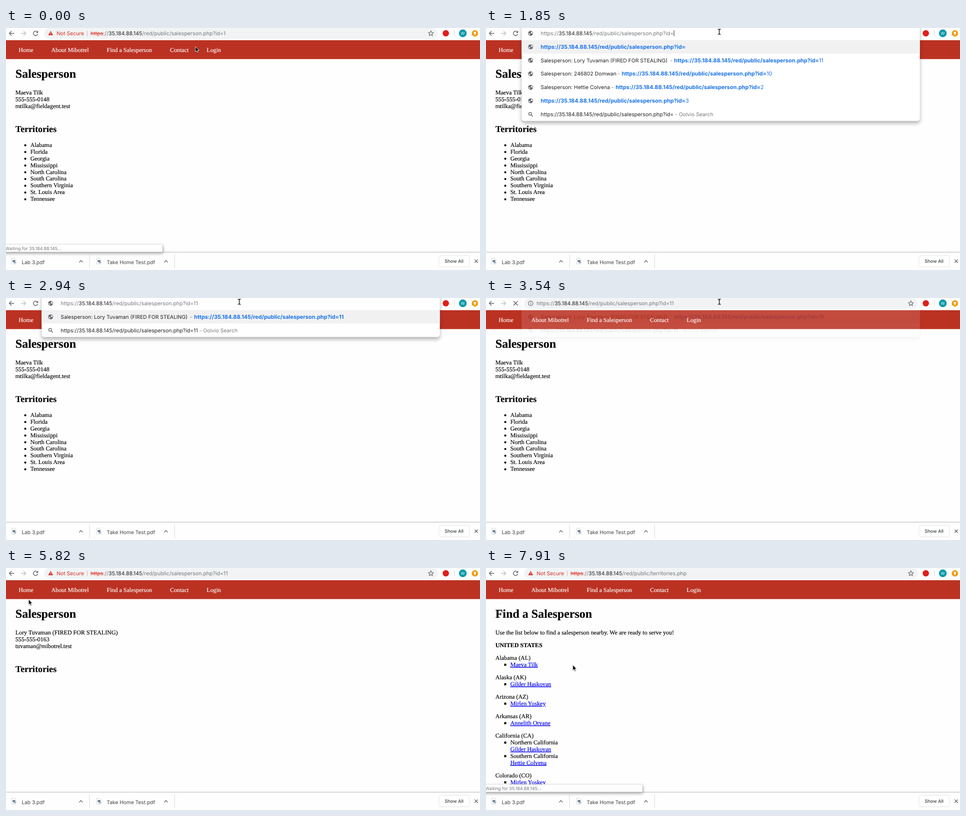
Recreate the animation shown at these times as an HTML page. Size 1047 px wide and 535 px high, loop 8 s.

```html
<!DOCTYPE html>
<html lang="en">
<head>
<meta charset="utf-8">
<title>Salesperson</title>
<style>
  html, body { margin: 0; width: 100%; height: 100%; overflow: hidden; background: #fefefe; }
  svg { display: block; width: 100%; height: 100%; }
  text { text-rendering: geometricPrecision; white-space: pre; }
  .ui { font: 11.47px Inter, Roboto, sans-serif; fill: #202124; }
  .serif { font: 13.27px "Liberation Serif", "Noto Serif", serif; fill: #000; stroke: #000; stroke-width: .18; }
  .h1 { font-size: 26.5px; font-weight: bold; }
  .h2 { font-size: 19.9px; font-weight: bold; }
  .b { font-weight: bold; }
  .url { font-size: 11.7px; }
  .match { font-size: 12.05px; fill: #1a73e8; }
  .nav { fill: #fff; stroke: #fff; }
  .link { fill: #0000ee; stroke: #0000ee; text-decoration: underline; }
  .dim { fill: #74787d; }
  .red { fill: #d93025; }
  .strike { text-decoration: line-through; }
  .line { fill: none; stroke: #5f6368; stroke-width: 1.5; }
  .thin { stroke-width: 1.2; }
  #popup { filter: drop-shadow(0 5px 4px rgba(0, 0, 0, .3)); }
  #status { filter: drop-shadow(1px 3px 3px rgba(0, 0, 0, .35)); }
  #cursor { filter: drop-shadow(0 1px 1px rgba(0, 0, 0, .3)); }
</style>
</head>
<body>
<svg viewBox="0 0 1047 535" preserveAspectRatio="none">
  <defs>
    <path id="arrow" d="M0 0V11.6L2.6 9.2 4.3 13.2 6.3 12.4 4.6 8.5H8.3Z" fill="#000" stroke="#fff" stroke-width=".9"/>
    <path id="ibeam" d="M-3-5.7Q0-5.7 0-4Q0-5.7 3-5.7M0-4V4M-3 5.7Q0 5.7 0 4Q0 5.7 3 5.7" fill="none" stroke="#111" stroke-width="1.3"/>
    <path id="hand" d="M0 0Q1.4 0 1.4 1.4V5L6 6Q7.6 6.5 7.3 8.3L6.5 13H.2L-3.3 8.4Q-2.6 7-1.4 8.2V1.4Q-1.4 0 0 0Z" fill="#fff" stroke="#000" stroke-width=".9"/>
    <g id="globe">
      <circle r="5.4" fill="#5f6368"/>
      <path d="M-4-1L-1 1.5V4.2Q-4 3-4.2 0ZM-1-4.2H2L1.5-2H0V0H2.5L4 2.2Q4.8 0 3.6-2.6L2.8-3.4Z" fill="#fff"/>
    </g>
    <g id="lens" class="line"><circle cx="-1" cy="-1" r="3.1"/><path d="M1.3 1.3L5 5"/></g>
    <g id="file">
      <path d="M0 0H6.5L9.5 3V13H0Z" fill="#fff" stroke="#c4c8cc" stroke-width=".8"/>
      <path d="M2 4.5H8V8H2ZM4 9H9V10.5H4Z" fill="#53688a"/>
    </g>
    <path id="chevron" class="line" d="M-3.7 1.9L0-1.9 3.7 1.9"/>
  </defs>

  <rect width="1047" height="535" fill="#fefefe"/>
  <g id="page" class="serif"></g>

  <rect y="27" width="1047" height="41.7" fill="#bb3223"/>
  <g class="serif">
    <text class="nav" x="28" y="53">Home</text>
    <text class="nav" x="100" y="53">About Mibotrel</text>
    <text class="nav" x="222.5" y="53">Find a Salesperson</text>
    <text class="nav" x="362.3" y="53">Contact</text>
    <text class="nav" x="443.3" y="53">Login</text>
  </g>

  <rect width="1047" height="27" fill="#fefefe"/>
  <path class="line" d="M18 11.7H7.5M12.3 6.7L7.3 11.7 12.3 16.7"/>
  <path class="line" d="M33 11.7H43.5M38.7 6.7L43.7 11.7 38.7 16.7" style="stroke:#bfc1c4"/>
  <g id="reload"></g>
  <circle cx="971.5" cy="11.7" r="7" fill="#e0201b"/>
  <path d="M990.5 5V18" stroke="#d5d7da"/>
  <circle cx="1009" cy="11.7" r="8.5" fill="#0097a7"/>
  <text class="ui" x="1009" y="15" text-anchor="middle" style="font-size:9px;fill:#fff">W</text>
  <circle cx="1035.7" cy="11.9" r="7" fill="#f29900"/>
  <path d="M1035.7 7.6L1039.4 11.8H1037V15.6H1034.4V11.8H1032Z" fill="#fff"/>

  <g id="popup" class="ui"></g>
  <g id="bar" class="ui"></g>

  <g class="ui">
    <rect y="495" width="1047" height="40" fill="#fefefe"/>
    <path d="M0 495.5H1047" stroke="#adadad"/>
    <path d="M184.5 501V531M372.5 501V531" stroke="#d6d6d6"/>
    <use href="#file" x="12.5" y="509"/>
    <use href="#file" x="200.5" y="509"/>
    <g style="font-size:11.25px" fill="#444">
      <text x="34.7" y="521.6">Lab 3.pdf</text>
      <text x="222.6" y="521.6">Take Home Test.pdf</text>
    </g>
    <use href="#chevron" x="165.5" y="516"/>
    <use href="#chevron" x="353.3" y="516"/>
    <rect x="956.5" y="502.5" width="67" height="25.5" rx="3.5" fill="#fff" stroke="#e2e3e5"/>
    <text x="989.8" y="518.8" text-anchor="middle" style="font-size:10px;font-weight:500" fill="#3c4043">Show All</text>
    <path class="line" d="M1035.2 512L1042.2 519M1042.2 512L1035.2 519"/>
  </g>

  <g id="status" class="ui">
    <rect x="-6" y="478.3" width="351.7" height="17" rx="1.5" fill="#fefefe" stroke="#c8c8c8" stroke-width=".6"/>
    <text class="dim" x="-2" y="490.6" style="font-size:9.85px">Waiting for 35.184.88.145...</text>
  </g>
  <use id="cursor"/>
</svg>

<script>
const LOOP = 8000, LINE = 14.93, ROW = 29.83;
const $ = id => document.getElementById(id);
const text = (x, y, s, cls = '') => `<text x="${x}" y="${y}" class="${cls}">${s}</text>`;
const span = (s, cls) => `<tspan class="${cls}">${s}</tspan>`;
const icon = (id, y) => `<use href="#${id}" x="98.5" y="${y}"/>`;

// Pages
const profile = (name, phone, mail, areas) =>
  text(20.7, 110, 'Salesperson', 'h1') +
  [name, phone, mail].map((s, i) => text(20.7, 146.8 + i * LINE, s)).join('') +
  text(20.7, 229.6, 'Territories', 'h2') +
  areas.map((s, i) => {
    const y = 262.8 + i * LINE;
    return `<circle cx="42.6" cy="${y - 3.6}" r="2.2"/>` + text(53.7, y, s);
  }).join('');

function directory() {
  const groups = [
    ['Alabama (AL)', '*Maeva Tilk'],
    ['Alaska (AK)', '*Gilder Haskovan'],
    ['Arizona (AZ)', '*Mirlen Yoskey'],
    ['Arkansas (AR)', '*Annelith Orvane'],
    ['California (CA)', 'Northern California', '*Gilder Haskovan', 'Southern California', '*Hettie Colvena'],
    ['Colorado (CO)', '*Mirlen Yoskey']
  ];
  let y = 203, out = text(20.7, 110, 'Find a Salesperson', 'h1') +
    text(20.7, 146.8, 'Use the list below to find a salesperson nearby. We are ready to serve you!') +
    text(20.7, 174.9, 'UNITED STATES', 'b');
  for (const [state, ...items] of groups) {
    out += text(20.7, y, state);
    items.forEach((s, i) => {
      y += LINE;
      const link = s[0] === '*';
      if (!link || i === 0) out += `<rect x="40.4" y="${y - 6.2}" width="4.4" height="4.4"/>`;
      out += text(53.7, y, link ? s.slice(1) : s, link ? 'link' : '');
    });
    y += 28.1;
  }
  return out;
}

const first = profile('Maeva Tilk', '555-555-0148', 'mtilka@fieldagent.test',
  ['Alabama', 'Florida', 'Georgia', 'Mississippi', 'North Carolina', 'South Carolina',
   'Southern Virginia', 'St. Louis Area', 'Tennessee']);
const second = profile('Lory Tuvaman (FIRED FOR STEALING)', '555-555-0163', 'tuvaman@mibotrel.test', []);

// Address bar
const HOST = '35.184.88.145', PATH = '/red/public/', SALES = 'salesperson.php?id=';
const BASE = 'https://' + HOST + PATH + SALES;
const url = (x, file, scheme = 'dim') => text(x, 15.9,
  span('https', scheme) + span('://', 'dim') + HOST + span(PATH + file, 'dim'), 'url');
const caret = x => x ? `<path d="M${x} 5V18" stroke="#202124" stroke-width="1"/>` : '';
const pill = focus => `<rect x="84" y=".4" width="869.5" height="23" rx="11.5" ` +
  (focus ? 'fill="#fff" stroke="#9dbdf3" stroke-width="1.8"/>' : 'fill="#f1f3f4"/>');
const star = '<path class="line thin" d="M938.5 6.3L940.1 10 944.1 10.3 941.1 12.9 942 16.8 938.5 14.7 935 16.8 935.9 12.9 932.9 10.3 936.9 10Z"/>';
const warning = '<path d="M98.7 6.6L104.1 16H93.3Z" fill="#d93025"/><path d="M98.7 9.8V12.6M98.7 13.5V14.8" stroke="#fff" stroke-width="1.1"/>' +
  text(111.7, 15.9, 'Not Secure', 'red') + '<path d="M179.5 6V18" stroke="#b9bcc0"/>';
const info = '<circle cx="98.7" cy="11.7" r="5.1" class="line thin"/><path class="line thin" d="M98.7 8.6V9.9M98.7 11V14.6"/>';

const bars = {
  page: s => pill() + warning + url(186.8, s.file, 'red strike') + star,
  select: s => pill(true) + warning + '<rect x="187" y="4.5" width="299.5" height="14" fill="#b3d4fc"/>' +
    url(186.8, s.file, 'strike') + star,
  edit: s => pill(true) + warning + url(186.8, s.file, 'red strike') + caret(s.caret) + star,
  popup: s => icon('globe', 11.7) + url(120.8, s.file) + caret(s.caret),
  load: s => pill() + info + url(111.7, s.file) + star
};

// Suggestions: [title, x of the address, bold part of the id, plain part]
const LORY = 'Salesperson: Lory Tuvaman (FIRED FOR STEALING)', NUM = 'Salesperson: 246802 Domwan';
const lists = {
  '': [['', 120.8, '', ''], [LORY, 415.5, '', '11'], [NUM, 299.7, '', '10'],
       ['Salesperson: Hettie Colvena', 286.3, '', '2'], ['', 120.8, '', '3']],
  '1': [['Salesperson: Maeva Tilk', 262, '1', ''], [LORY, 415.5, '1', '1'], [NUM, 299.7, '1', '0']],
  '11': [[LORY, 415.5, '11', '']]
};

function popup(id) {
  const rows = lists[id], n = rows.length;
  let out = `<rect x="78.7" y="-10" width="879.6" height="${37 + (n + 1) * ROW - .4}" rx="6" fill="#fff"/>` +
    `<rect x="78.7" y="26.7" width="879.6" height="${ROW}" fill="#f1f1f2"/>`;
  rows.forEach(([title, x, bold, plain], i) => {
    const y = 41.6 + i * ROW, base = y + 4.1;
    out += icon('globe', y) +
      (title ? text(120.8, base, title) + text(x - 9.3, base, '-', 'dim') : '') +
      text(x, base, span(BASE + bold, 'b') + plain, 'match');
  });
  const y = 41.6 + n * ROW;
  return out + icon('lens', y) +
    text(120.8, y + 4.1, span(BASE + id, 'url') + span(' - Oolvio Search', 'dim'));
}

const reload = '<path class="line" d="M69 8.6A4.9 4.9 0 1 0 70.1 13"/><path d="M71 6V10.8H66.2Z" fill="#5f6368"/>';
const stop = '<path class="line" d="M60.7 7L70.1 16.4M70.1 7L60.7 16.4"/>';

// Each step changes part of the state and holds until the next one.
const arrow = (x, y) => ({ cursor: ['arrow', x, y] });
const beam = (x, y) => ({ cursor: ['ibeam', x, y] });
const hand = (x, y) => ({ cursor: ['hand', x, y] });
const sweep = (from, to, points) => points.map(([x, y], i) =>
  [from + (to - from) * i / (points.length - 1), arrow(x, y)]);

const steps = [
  [0, { page: first, mode: 'page', file: SALES + 1, status: true, list: null, fade: 1, caret: 0, busy: false, ...arrow(418.3, 41) }],
  [180, { status: false, ...arrow(450, 28) }],
  [340, beam(500, 14)],
  [500, beam(543, 9)],
  [650, beam(515.4, 8.2)],
  [950, { mode: 'select' }],
  [1250, { mode: 'edit', caret: 487.3 }],
  [1850, { mode: 'popup', file: SALES, list: '', caret: 415.3 }],
  [2290, { file: SALES + 1, list: '1', caret: 420.3 }],
  [2490, { file: SALES + 11, list: '11', caret: 425.5 }],
  [2940, { caret: 0 }],
  [3540, { mode: 'load', fade: .13, busy: true }],
  [3720, { list: null, fade: 1 }],
  [3870, { mode: 'page', page: second, busy: false }],
  [4350, arrow(304.3, 84.5)],
  [4500, arrow(175, 117)],
  ...sweep(4790, 5820, [[200, 172], [282, 217], [341, 190], [325, 140], [245, 108], [140, 112], [42, 100], [50, 69.5]]),
  ...sweep(5960, 6990, [[56, 108], [92, 172], [150, 223], [212, 212], [242, 168], [256, 118], [267, 78], [276, 36]]),
  [6990, hand(277, 35.5)],
  [7290, hand(276, 48.5)],
  [7590, { status: true, busy: true }],
  [7750, { page: directory(), file: 'territories.php', busy: false, ...arrow(236, 140) }],
  [7910, arrow(191.8, 214.5)]
];

function render(s) {
  $('page').innerHTML = s.page;
  $('bar').innerHTML = bars[s.mode](s);
  $('popup').innerHTML = s.list === null ? '' : popup(s.list);
  $('popup').style.opacity = s.fade;
  $('reload').innerHTML = s.busy ? stop : reload;
  $('status').style.display = s.status ? '' : 'none';
  const [shape, x, y] = s.cursor;
  $('cursor').setAttribute('href', '#' + shape);
  $('cursor').setAttribute('transform', `translate(${x} ${y})`);
}

const start = performance.now();
let shown = 0;
function tick() {
  const t = (performance.now() - start) % LOOP;
  const count = steps.filter(([at]) => at <= t).length;
  if (count !== shown) {
    shown = count;
    render(Object.assign({}, ...steps.slice(0, count).map(([, change]) => change)));
  }
  requestAnimationFrame(tick);
}
tick();
</script>
</body>
</html>
```
